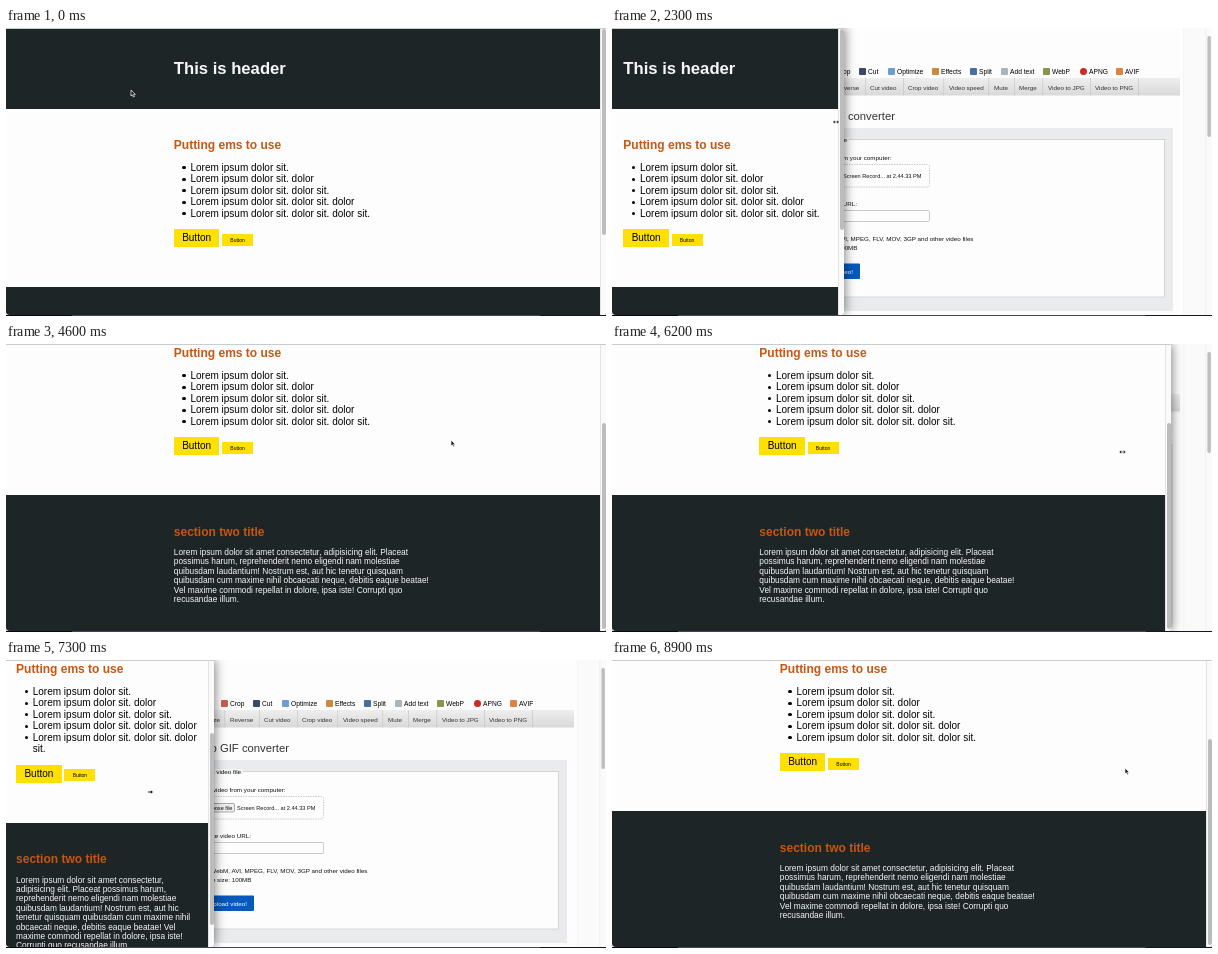
An HTML page that plays this animation: 600 px wide and 288 px high, repeating every 9 s.

```html
<!DOCTYPE html>
<html lang="en">
<head>
<meta charset="utf-8">
<title>Responsive ems</title>
<style>
html, body { margin: 0; width: 100%; height: 100%; overflow: hidden; }
#stage { position: relative; width: 600px; height: 288px; overflow: hidden; background: #fdfdfd;
  font-family: "Liberation Sans", Arial, sans-serif; }
#back, #cursor { position: absolute; left: 0; top: 0; }
#win { position: absolute; left: 0; top: 0; height: 287px; overflow: hidden; background: #fdfdfd;
  box-shadow: 1px 0 11px rgba(0,0,0,.5); border-radius: 0 0 4px 4px; }
#view { position: absolute; left: 0; top: 1px; right: 6px; height: 286px; overflow: hidden; }
#topline { position: absolute; left: 0; top: 0; width: 100%; height: 1.3px; background: #c9cbcc; }
#bar { position: absolute; right: 0; top: 1px; width: 6px; height: 287px; background: #fafafa; border-left: .5px solid #e4e4e4; box-sizing: border-box; }
#thumb { position: absolute; left: 1.2px; width: 3.6px; border-radius: 2px; background: #bcbcbc; }
#bottom { position: absolute; left: 0; top: 287px; width: 600px; height: 1px;
  background: linear-gradient(90deg, #08080c 66px, #45425c 66px, #45425c 534px, #15152a 534px); }
.col { width: 90%; max-width: 258.4px; margin: 0 auto; }
header, .dark { background: #1d2526; color: #f7f7f7; }
header { height: 79.5px; }
h1, h2, ul, p { margin: 0; }
h1 { font-size: 16.67px; line-height: 20px; padding-top: 30px; white-space: nowrap; }
section { padding: 29.5px 0; }
h2 { font-size: 12px; line-height: 14px; margin-bottom: 9.5px; color: #c8560f; }
ul { list-style: none; padding-left: 16.67px; font-size: 10px; line-height: 11.5px; color: #000; }
li { position: relative; }
li::before { content: ""; position: absolute; left: -8px; top: 4.6px; width: 3.2px; height: 3.2px; border-radius: 50%; background: #000; }
.light { padding-bottom: 40px; }
.buttons { position: relative; height: 18px; margin-top: 10px; }
.buttons span { position: absolute; background: #ffe000; color: #000; text-align: center; }
.big { left: 0; top: 0; width: 45.6px; height: 18px; font-size: 10px; line-height: 18px; }
.small { left: 48.3px; top: 4.6px; width: 31px; height: 12.4px; font-size: 5px; line-height: 12.4px; }
.dark p { font-size: 8.33px; line-height: 9.4px; }
</style>
</head>
<body>
<div id="stage">
  <svg id="back" width="600" height="288"></svg>
  <div id="win">
    <div id="view"><div id="page">
      <header><div class="col"><h1>This is header</h1></div></header>
      <section class="light"><div class="col">
        <h2>Putting ems to use</h2>
        <ul>
          <li>Lorem ipsum dolor sit.</li>
          <li>Lorem ipsum dolor sit. dolor</li>
          <li>Lorem ipsum dolor sit. dolor sit.</li>
          <li>Lorem ipsum dolor sit. dolor sit. dolor</li>
          <li>Lorem ipsum dolor sit. dolor sit. dolor sit.</li>
        </ul>
        <div class="buttons"><span class="big">Button</span><span class="small">Button</span></div>
      </div></section>
      <section class="dark"><div class="col">
        <h2>section two title</h2>
        <p>Lorem ipsum dolor sit amet consectetur, adipisicing elit. Placeat possimus harum, reprehenderit nemo eligendi nam molestiae quibusdam laudantium! Nostrum est, aut hic tenetur quisquam quibusdam cum maxime nihil obcaecati neque, debitis eaque beatae! Vel maxime commodi repellat in dolore, ipsa iste! Corrupti quo recusandae illum.</p>
      </div></section>
    </div></div>
    <div id="bar"><div id="thumb"></div></div>
    <div id="topline"></div>
  </div>
  <div id="bottom"></div>
  <svg id="cursor" width="600" height="288">
    <g id="hand" stroke-linejoin="round">
      <path id="arrow" d="M0 0V6L1.4 4.8L2.4 7L3.5 6.5L2.5 4.4H4.3Z" fill="#111" stroke="#fff" stroke-width=".7"/>
      <path id="both" d="M-3.2 0L-1.2-1.9V-.6H1.2V-1.9L3.2 0L1.2 1.9V.6H-1.2V1.9Z" fill="#000" stroke="#fff" stroke-width=".5"/>
      <path id="right" d="M-2.6-.7H.2V-2L2.8 0L.2 2V.7H-2.6Z" fill="#000" stroke="#fff" stroke-width=".5"/>
    </g>
  </svg>
</div>
<script>
const $ = id => document.getElementById(id);
const LOOP = 9000, STEP = 100, MIN_WIDTH = 208;

// The page behind the window
const rect = (x, y, w, h, fill, more = "") =>
  `<rect x="${x}" y="${y}" width="${w}" height="${h}" fill="${fill}" ${more}/>`;
const text = (x, y, size, str, fill = "#111", anchor = "start") =>
  `<text x="${x}" y="${y}" font-size="${size}" fill="${fill}" text-anchor="${anchor}">${str}</text>`;
const endText = (x, y, size, str, fill) => text(x, y, size, str, fill, "end");

function drawBack() {
  const tools = [[224, "Crop", "#c4604c"], [256, "Cut", "#3c4868"], [285, "Optimize", "#6d9fcd"],
    [329, "Effects", "#c98940"], [367, "Split", "#476f9f"], [398, "Add text", "#aab4bd"],
    [440, "WebP", "#8b9350"], [477, "APNG", "#cc2a22"], [513, "AVIF", "#dc8244"]];
  const tabs = [[224, "Reverse", 253], [258, "Cut video", 291], [296, "Crop video", 331.5],
    [337, "Video speed", 376.5], [382, "Mute", 402], [407, "Merge", 430.5],
    [436, "Video to JPG", 478], [483, "Video to PNG", 526]];
  let s = `<defs><linearGradient id="tab" x2="0" y2="1"><stop stop-color="#eeeeee"/><stop offset="1" stop-color="#d9d9d9"/></linearGradient></defs>`;
  s += rect(572, 0, 22, 288, "#fafafa") + rect(571.5, 0, .6, 288, "#eeeeee");
  for (const [x, name, fill] of tools)
    s += rect(x - 9, 40, 7, 7, fill, `rx="${name === "APNG" ? 3.5 : 1}"`) + text(x, 46, 6.67, name, "#000");
  s += rect(0, 50, 568, 17.5, "url(#tab)") + endText(214, 62, 6.25, "Resize", "#333") + rect(218.5, 50, .6, 17.5, "#c4c4c4");
  for (const [x, name, edge] of tabs)
    s += text(x, 62, 6.25, name, "#333") + rect(edge, 50, .6, 17.5, "#c4c4c4");
  s += endText(283, 92, 11.3, "Video to GIF converter", "#333");
  s += rect(0, 100, 561, 183, "#e9ebed") + rect(100, 111.5, 452.5, 157.5, "#fdfdfd", 'stroke="#c8c8c8" stroke-width=".7"');
  s += rect(180, 109, 57, 5, "#f3f4f5") + endText(235, 114, 6.25, "Upload video file");
  s += endText(279.5, 131.5, 6.25, "Select video from your computer:");
  s += rect(120, 136.5, 197.5, 22.5, "#fdfdfd", 'rx="2" stroke="#aaa" stroke-width=".6" stroke-dasharray="1.5 1"');
  s += rect(190, 143.5, 38.5, 8.5, "#efefef", 'rx="1" stroke="#777" stroke-width=".6"') + endText(226.5, 150, 5.6, "Choose file");
  s += text(231, 150, 5.6, "Screen Record... at 2.44.33 PM");
  s += endText(245, 177.5, 6.25, "or paste video URL:");
  s += rect(120, 182.5, 197.5, 11, "#fff", 'rx="1" stroke="#aaa" stroke-width=".6"');
  s += endText(361.5, 213, 6.25, "MP4, WebM, AVI, MPEG, FLV, MOV, 3GP and other video files");
  s += endText(245.5, 221.5, 6.25, "Max file size: 100MB");
  s += rect(190, 235.5, 58, 15.5, "#0759bd", 'rx="1"') + endText(241, 245.5, 6.25, "Upload video!", "#fff");
  s += rect(594, 0, 6, 288, "#fafafa") + rect(593.7, 0, .5, 288, "#e4e4e4") + rect(595.4, 8, 3.5, 101, "#bfbfbf", 'rx="1.7"');
  $("back").innerHTML = s;
}

// Rows: time, then values
const width = [[0, 600], [1100, 600], [2000, 326], [2300, 232], [2500, 208], [3000, 500],
  [3400, 470], [3600, 506], [3900, 600], [6000, 600], [6200, 559], [6700, 208], [7400, 208],
  [7800, 435], [8100, 314], [8500, 600]];
const scroll = [[0, 0], [3900, 0], [4500, 108]];
const pointer = [[0, 125, 62], [400, 60, 45], [1000, 596, 95], [2000, 320, 95], [2300, 224, 94],
  [2500, 198, 92], [3000, 515, 84], [3400, 470, 80], [3600, 527, 80], [3900, 597, 85],
  [4100, 540, 95], [4600, 445, 96], [5300, 520, 110], [6000, 594, 108], [6200, 510.5, 108],
  [6700, 160, 120], [7300, 144.5, 132], [7800, 440, 125], [8100, 312, 118], [8500, 597, 110], [8900, 513, 108]];

function at(rows, t) {
  const i = rows.findIndex(r => r[0] > t);
  if (i < 0) return rows[rows.length - 1].slice(1);
  const a = rows[i - 1], b = rows[i], k = (t - a[0]) / (b[0] - a[0]);
  return a.slice(1).map((v, n) => v + (b[n + 1] - v) * k);
}

function render(t) {
  const [w] = at(width, t), [top] = at(scroll, t), [x, y] = at(pointer, t);
  $("win").style.width = w + "px";
  $("page").style.transform = `translateY(${-top}px)`;
  const track = 286, ratio = track / $("page").offsetHeight;
  $("thumb").style.top = top * ratio + "px";
  $("thumb").style.height = track * ratio + "px";
  const resizing = (t >= 1000 && t <= 3900) || (t >= 6000 && t <= 8500);
  const shape = !resizing ? "arrow" : w <= MIN_WIDTH ? "right" : "both";
  for (const id of ["arrow", "both", "right"]) $(id).style.display = id === shape ? "" : "none";
  $("hand").setAttribute("transform", `translate(${x} ${y})`);
}

drawBack();
render(0);
const start = performance.now();
(function tick() {
  const t = Math.max(0, performance.now() - start) % LOOP;
  render(Math.floor(t / STEP) * STEP);
  requestAnimationFrame(tick);
})();
</script>
</body>
</html>
```
